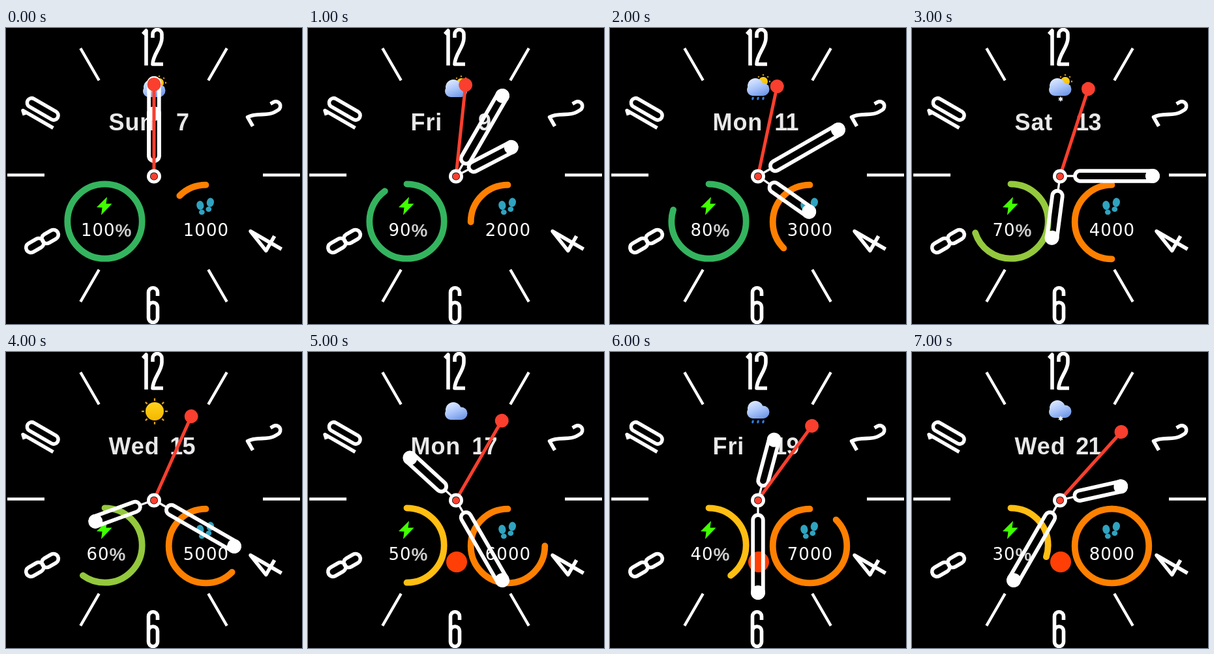
Recreate the animation shown at these times as an HTML page with a canvas. Size 454 by 454 pixels, loop 8000 ms.

```html
<!DOCTYPE html>
<html lang="en">
<head>
<meta charset="utf-8">
<title>Watch face</title>
<style>
html, body { margin: 0; width: 100%; height: 100%; overflow: hidden; background: #000; }
canvas { display: block; width: 454px; height: 454px; }
</style>
</head>
<body>
<canvas id="face" width="454" height="454"></canvas>
<script>
const ctx = document.getElementById('face').getContext('2d');
const TAU = Math.PI * 2, RAD = Math.PI / 180;
const WHITE = '#fff', RED = '#fa3f2e', ORANGE = '#ff8000';
const STEP = 1000, STEPS = 8;
const DAYS = ['Sun', 'Mon', 'Tue', 'Wed', 'Thu', 'Fri', 'Sat'];

// Numeral outlines centred on the origin, 58 px tall with the stroke
const GLYPHS = {
  0: 'M-7-19.5a7 7 0 0 1 14 0V19.5a7 7 0 0 1-14 0Z',
  1: 'M-5-19.5L0-25V28.5',
  2: 'M-7-14V-19.5a7 7 0 0 1 14 0V-13C7 0-7 12-7 26.5H9',
  4: 'M0 28.5V-26.5L-14 9H12',
  6: 'M7-14V-19.5a7 7 0 0 0-14 0V19.5a7 7 0 0 0 14 0V3a7 7 0 0 0-14 0',
  8: 'M-7.5-20a6.5 6.5 0 0 1 15 0V-8a6.5 6.5 0 0 1-15 0ZM-7.5 6a6.5 6.5 0 0 1 15 0V20a6.5 6.5 0 0 1-15 0Z'
};
const NUMERALS = [
  ['12', 225.5, 29, 0], ['2', 397, 129.5, 60], ['4', 398, 325, -60],
  ['6', 225.5, 425, 0], ['8', 55.5, 327, 60], ['10', 53, 130, -60]
];

function at(x, y, degrees, draw) {
  ctx.save();
  ctx.translate(x, y);
  ctx.rotate(degrees * RAD);
  draw();
  ctx.restore();
}

function disc(x, y, r, color, ry = r, turn = 0) {
  ctx.fillStyle = color;
  ctx.beginPath();
  ctx.ellipse(x, y, r, ry, turn, 0, TAU);
  ctx.fill();
}

function line(x1, y1, x2, y2, color, width) {
  ctx.strokeStyle = color;
  ctx.lineWidth = width;
  ctx.beginPath();
  ctx.moveTo(x1, y1);
  ctx.lineTo(x2, y2);
  ctx.stroke();
}

function label(text, x, y, font, color, align = 'left', spacing = 0) {
  ctx.font = font;
  ctx.fillStyle = color;
  ctx.textAlign = align;
  ctx.letterSpacing = spacing + 'px';
  ctx.fillText(text, x, y);
}

function dial() {
  for (let a = 30; a < 360; a += 60) {
    at(226.5, 225.5, a, () => line(0, -167.5, 0, -224.5, WHITE, 4.3));
  }
  for (const [text, x, y, angle] of NUMERALS) {
    at(x, y, angle, () => {
      ctx.strokeStyle = WHITE;
      ctx.lineWidth = 5.6;
      ctx.lineJoin = 'round';
      [...text].forEach((digit, i) => {
        ctx.save();
        if (text.length > 1) ctx.translate(i ? 6.5 : -10.5, 0);
        ctx.stroke(new Path2D(GLYPHS[digit]));
        ctx.restore();
      });
    });
  }
}

function ring(x, y, r, sweep, color) {
  const top = -Math.PI / 2;
  ctx.strokeStyle = color;
  ctx.lineWidth = 9.8;
  ctx.lineCap = 'round';
  ctx.beginPath();
  ctx.arc(x, y, r, top, top + sweep * TAU, sweep < 0);
  ctx.stroke();
  ctx.lineCap = 'butt';
}

function sun(x, y, r, reach) {
  for (let i = 0; i < 8; i++) {
    at(x, y, i * 45, () => line(0, -r - 2, 0, -reach, '#d99a1c', 2.3));
  }
  const glow = ctx.createLinearGradient(x, y - r, x, y + r);
  glow.addColorStop(0, '#ffd21c');
  glow.addColorStop(1, '#f5b800');
  disc(x, y, r, glow);
}

function cloud(y) {
  const shade = ctx.createLinearGradient(220, y - 14, 232, y + 14);
  shade.addColorStop(0, '#dce8ff');
  shade.addColorStop(0.5, '#a9c4fa');
  shade.addColorStop(1, '#6f97e6');
  ctx.fillStyle = shade;
  ctx.beginPath();
  ctx.arc(223, y - 2, 12, 0, TAU);
  ctx.arc(235, y + 3, 9.5, 0, TAU);
  ctx.roundRect(210, y - 5, 34, 18, 9);
  ctx.fill();
}

function rain(y) {
  for (const x of [219, 227, 235]) disc(x, y, 1.7, '#2f7de0', 2.6, 0.3);
}

function snow(y) {
  for (let a = 0; a < 180; a += 60) {
    at(228, y, a, () => line(0, -3.5, 0, 3.5, '#eef4ff', 1.8));
  }
}

const WEATHER = [
  () => { sun(235, 84, 7, 11); cloud(93); },
  () => { sun(235, 82, 7, 11); cloud(91); rain(108); },
  () => { sun(235, 82, 7, 11); cloud(91); snow(109); },
  () => sun(228, 91, 14, 20),
  () => cloud(91),
  () => { cloud(89); rain(107); },
  () => { cloud(88); snow(102); }
];

function bolt() {
  ctx.fillStyle = '#42ff00';
  ctx.fill(new Path2D('M155 259L139 275L147.5 275.5L146 287L162.5 269.5L153.5 269.5Z'));
}

function footprints() {
  const teal = '#2fa3c0';
  disc(297.8, 272, 5.6, teal, 7, -0.2);
  disc(300.3, 282.5, 4.4, teal, 4);
  disc(313.4, 267.5, 5.6, teal, 7, 0.2);
  disc(310.8, 278, 4.4, teal, 4);
}

function digits(value, x) {
  label(value, x, 319, '26px "DejaVu Sans", sans-serif', WHITE, 'left', 1);
}

function battery(level) {
  const color = level > 70 ? '#34b45e' : level > 50 ? '#94c83d' : '#ffbe12';
  ring(151.5, 296.5, 57.2, level / 100, color);
  bolt();
  const text = String(level), x = text.length > 2 ? 115 : 123.5;
  digits(text, x);
  label('%', x + text.length * 17.5, 320, 'bold 28px "Liberation Sans", sans-serif', '#cacaca');
}

function steps(count) {
  ring(306.5, 297.5, 56.8, -count / 8000, ORANGE);
  footprints();
  digits(count, 271.8);
}

function hand(angle, length) {
  at(227, 227, angle, () => {
    line(0, 0, 0, -22, WHITE, 3.3);
    ctx.strokeStyle = WHITE;
    ctx.lineWidth = 5.8;
    ctx.beginPath();
    ctx.roundRect(-7.8, -length - 8, 15.6, length - 15, 7.8);
    ctx.stroke();
    disc(0, -length, 11, WHITE);
  });
}

function secondHand(angle) {
  at(227, 227, angle, () => {
    line(0, 0, 0, -140, RED, 5);
    disc(0, -140.5, 10.5, RED);
  });
}

function render(k) {
  ctx.fillStyle = '#000';
  ctx.fillRect(0, 0, 454, 454);
  dial();
  WEATHER[Math.max(0, k - 1)]();

  const date = new Date(2024, k, 7 + 2 * k);
  const font = 'bold 36px "Liberation Sans", sans-serif';
  label(DAYS[date.getDay()], 157.5, 157, font, '#e8e8e8', 'left', 0.9);
  label(date.getDate(), 270.5, 157, font, '#e8e8e8', 'center', -0.8);

  battery(100 - 10 * k);
  steps(1000 * (k + 1));
  if (k >= 5) disc(228, 322, 16, '#ff3f05');

  hand(62.5 * k, 95.5);
  hand(30 * k, 142);
  secondHand(6 * k);
  disc(227, 227.5, 11, WHITE);
  disc(227, 227.5, 6, '#000');
  disc(227, 227.5, 5.2, RED);
}

function frame() {
  render(Math.floor(performance.now() / STEP) % STEPS);
  requestAnimationFrame(frame);
}
frame();
</script>
</body>
</html>
```
